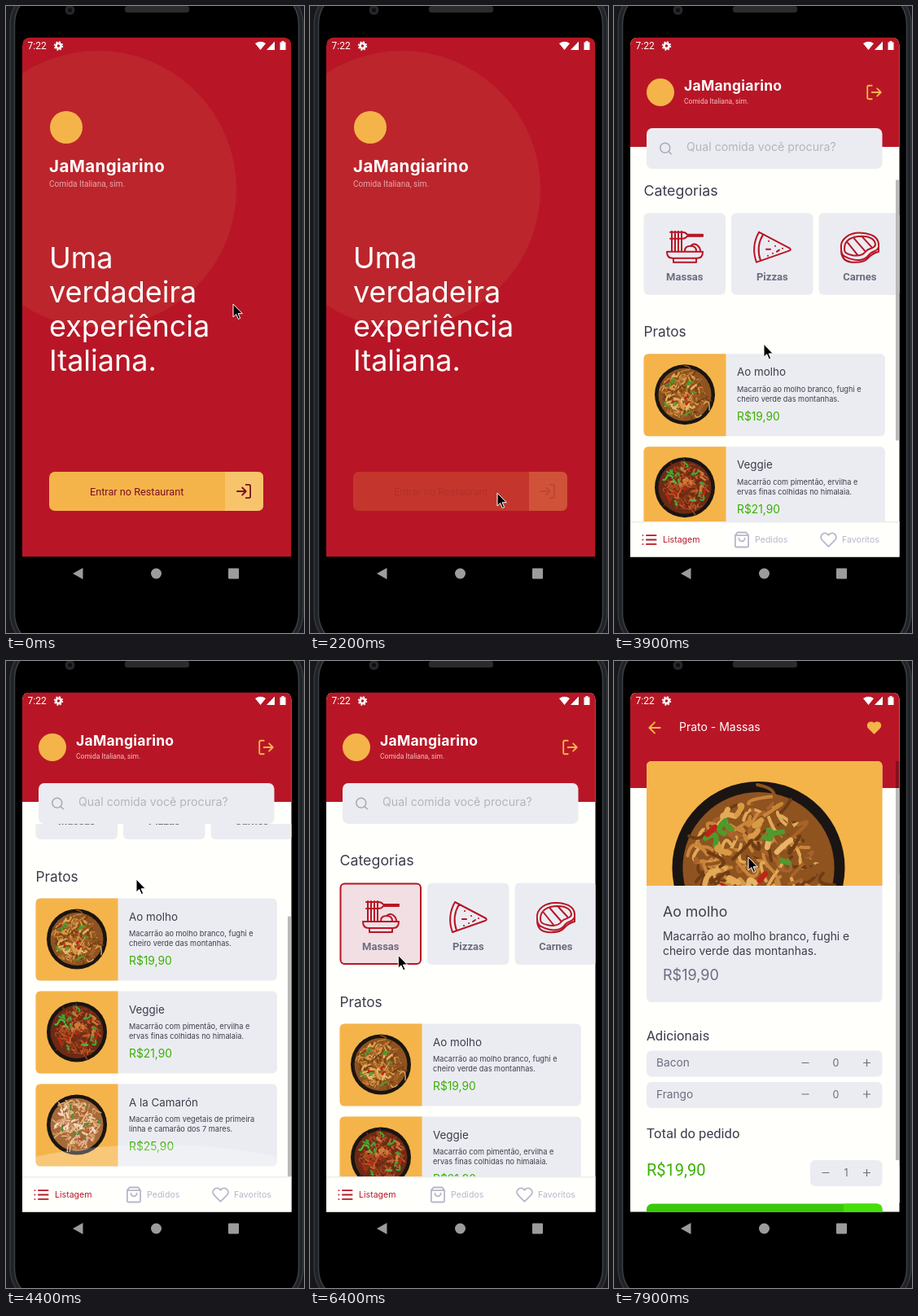
Write an HTML page that moves like this. It is 366 by 770 pixels and loops after 8 s.

```html
<!DOCTYPE html>
<html lang="pt">
<head>
<meta charset="utf-8">
<style>
html, body { margin: 0; width: 100%; height: 100%; overflow: hidden; background: #17181c; }
svg { display: block; width: 100vw; height: 100vh; font-family: Inter, sans-serif; }
.rb { font-family: Roboto, sans-serif; }
.press > * { opacity: var(--fade, 1); }
</style>
</head>
<body>
<script>
const RED = '#b81626', GOLD = '#f5b44a', PAPER = '#fffffc', CARD = '#ebecf1',
  INK = '#3d3d4d', GREY = '#6c6c80', PALE = '#b7b7cc', GREEN = '#39b100', BRAND = 'JaMangiarino';

// ---------- drawing helpers ----------
const text = (x, y, size, str, fill, more = '') =>
  `<text x="${x}" y="${y}" font-size="${size}" fill="${fill}" ${more}>${str}</text>`;
const roboto = (x, y, size, str, fill, more = '') => text(x, y, size, str, fill, 'class="rb" ' + more);
const rect = (x, y, w, h, fill, r = 0, more = '') =>
  `<rect x="${x}" y="${y}" width="${w}" height="${h}" rx="${r}" fill="${fill}" ${more}/>`;
const circle = (x, y, r, fill, more = '') => `<circle cx="${x}" cy="${y}" r="${r}" fill="${fill}" ${more}/>`;
const path = (d, fill, more = '') => `<path d="${d}" fill="${fill}" ${more}/>`;
const group = (id, body, more = '') => `<g id="${id}" ${more}>${body}</g>`;
// Box with a straight edge at x, rounded on the far side; a negative w points left
const cap = (x, y, w, h, fill, r) => {
  const k = Math.sign(w) * r;
  return path(`M${x} ${y}h${w - k}q${k} 0 ${k} ${r}v${h - 2 * r}q0 ${r} ${-k} ${r}h${k - w}z`, fill);
};
const icon = (x, y, k, color, d, fill = 'none') => path(d, fill,
  `stroke="${color}" stroke-width="2" stroke-linecap="round" stroke-linejoin="round"
   transform="translate(${x} ${y}) scale(${k}) translate(-12 -12)"`);
const stepper = (minus, mid, plus, y, n) =>
  path(`M${minus - 4.5} ${y}h9M${plus - 4.5} ${y}h9M${plus} ${y - 4.5}v9`, 'none', `stroke="${GREY}" stroke-width="1.2"`) +
  text(mid, y + 4.5, 12.5, n, GREY, 'text-anchor="middle"');

const HEART = 'M20.84 4.61a5.5 5.5 0 0 0-7.78 0L12 5.67l-1.06-1.06a5.5 5.5 0 0 0-7.78 7.78L12 21.23l8.84-8.84a5.5 5.5 0 0 0 0-7.78z';

// A plate of noodles, radius 37, around the origin
function plate(seed, noodles, toppings) {
  const rnd = () => (seed = seed * 16807 % 2147483647) / 2147483647;
  const pick = list => list[Math.floor(rnd() * list.length)];
  const off = n => ((rnd() - .5) * n).toFixed(1);
  const strand = (reach, size, width, colors) => {
    const a = rnd() * 6.283, d = reach * Math.sqrt(rnd());
    return path(`M${(d * Math.cos(a)).toFixed(1)} ${(d * Math.sin(a)).toFixed(1)}q${off(size)} ${off(size)} ${off(size)} ${off(size)}`,
      'none', `stroke="${pick(colors)}" stroke-width="${width}" stroke-linecap="round"`);
  };
  let s = circle(0, 0, 37, '#1a1512') + circle(0, 0, 32.5, noodles[0]);
  for (let i = 0; i < 170; i++) s += strand(28, 18, 1.4, noodles);
  for (let i = 0; i < 34; i++) s += strand(26, 12, 2.3, toppings);
  return s;
}
const plates = [
  plate(11, ['#8f5320', '#c9863a', '#e0a957', '#a8632a', '#6e3c14'], ['#4f9a2c', '#c02318', '#e8b568', '#d99a45', '#e3aa58']),
  plate(29, ['#6d2a15', '#a8451f', '#c4642c', '#8a3a1b'], ['#3fa535', '#4db53a', '#b52a17', '#d07b3a']),
  plate(53, ['#a8693a', '#e3b880', '#d39a62', '#f0d0a4'], ['#e8a79a', '#f4d9c4', '#5a8a3a', '#b8552f'])
];

// ---------- welcome screen ----------
const backdrop = rect(20, 38, 331, 640, PAPER);
const splash = rect(20, 38, 331, 640, RED) + circle(113, 225, 170, '#bc252c') +
  circle(74, 149, 20, GOLD) +
  text(53, 204, 20.5, BRAND, '#fff', 'font-weight="700" letter-spacing=".4"') +
  roboto(53, 222, 10, 'Comida Italiana, sim.', '#e8a5aa') +
  ['Uma', 'verdadeira', 'experiência', 'Italiana.'].map((s, i) => text(53, 322 + 42 * i, 36, s, '#fff')).join('') +
  group('enter', rect(53, 572, 263, 48, GOLD, 7) + cap(269, 572, 47, 48, '#f7c46c', 7) +
    roboto(103, 601, 12.7, 'Entrar no Restaurant', '#7a1020') +
    icon(292, 596, .9, '#7a1020', 'M15 3h4a2 2 0 0 1 2 2v14a2 2 0 0 1-2 2h-4M10 17l5-5-5-5M15 12H3'), 'class="press"');

// ---------- list screen ----------
const line = d => path(d, 'none', `stroke="${RED}" stroke-width="2" stroke-linecap="round" stroke-linejoin="round"`);
const pictures = [
  'M65 320h44q0 8-7 8h-30q-7 0-7-8zM73 328v5h28v-5M69 296h15q4 0 6 3h19v2h-19q-2 3-6 3h-15M71 295v25M75 295v25M79 295v25M83 295v25M87 319q0-6 7-6t7 6M94 313q4-4 8-1t4 7',
  'M178 296L216 316q2 2-1 3L175 333Q168 314 178 296M183 299Q174 314 180 331M190 307h.1M187 317h5M189 325h.1M198 313h.1M200 320l3-2M207 316h.1M195 322h.1',
  'M279 317C277 304 290 296 304 297S326 303 325 314C324 321 317 318 313 324S300 332 291 329S279 324 279 317M283 316C283 306 292 301 304 301S321 306 321 312C319 317 313 315 309 320S299 326 291 324S283 320 283 316M287 309l12 15M295 304l13 15M305 302l11 12M279 320q1 12 13 13q15 1 20-5t13-8v-5'
];
const category = (name, i) => {
  const x = 36.5 + 107.5 * i;
  return group('cat' + i, rect(x, 272.5, 100.5, 100.5, CARD, 6) +
    (i ? '' : group('chosen', rect(x + 1, 273.5, 98.5, 98.5, '#f1dfe3', 5, `stroke="${RED}" stroke-width="2"`))) +
    line(pictures[i]) + roboto(x + 50.3, 355, 13, name, GREY, 'font-weight="600" text-anchor="middle"'), 'class="press"');
};
const dish = ([name, a, b, price], i) => group('dish' + i,
  rect(36.5, 0, 296.5, 101, CARD, 6) + cap(137.5, 0, -101, 101, GOLD, 6) +
  `<g><g class="photo" transform="translate(87 50)">${plates[i]}</g></g>` +
  text(151, 27, 13.4, name, INK) + text(151, 46.5, 9.2, a, INK) + text(151, 58.5, 9.2, b, INK) +
  text(151, 81.5, 13.8, price, GREEN), `class="press" transform="translate(0 ${445.5 + 114 * i})"`);
const dishes = [
  ['Ao molho', 'Macarrão ao molho branco, fughi e', 'cheiro verde das montanhas.', 'R$19,90'],
  ['Veggie', 'Macarrão com pimentão, ervilha e', 'ervas finas colhidas no himalaia.', 'R$21,90'],
  ['A la Camarón', 'Macarrão com vegetais de primeira', 'linha e camarão dos 7 mares.', 'R$25,90']
];
const tab = (x, label, color, d, ix) => text(x, 658.5, 10.6, label, color) + icon(ix, 655.5, .9, color, d);

const list = backdrop + rect(20, 38, 331, 135, RED) +
  circle(57, 106, 17, GOLD) +
  text(86, 104, 17.5, BRAND, '#fff', 'font-weight="700" letter-spacing=".25"') +
  roboto(86, 119.5, 8.5, 'Comida Italiana, sim.', '#f0c0c4') +
  icon(319.5, 106, .92, GOLD, 'M9 21H5a2 2 0 0 1-2-2V5a2 2 0 0 1 2-2h4M16 17l5-5-5-5M21 12H9') +
  rect(40, 150, 289.5, 50, CARD, 7) +
  icon(63.5, 175, .75, '#a9a9b8', 'M19 11a8 8 0 1 1-16 0 8 8 0 0 1 16 0M21 21l-4.35-4.35') +
  text(89, 177.5, 14.2, 'Qual comida você procura?', '#b4b4be') +
  `<g clip-path="url(#view)">` + group('scroll',
    text(36.5, 251, 17.8, 'Categorias', INK) + ['Massas', 'Pizzas', 'Carnes'].map(category).join('') +
    text(36.5, 424.5, 17.3, 'Pratos', INK) + group('dishes', dishes.map(dish).join(''))) +
  `<ellipse id="glow" cx="185" cy="662" rx="240" ry="68" fill="#fff"/>` +
  rect(346, 200, 4.5, 320, '#b9b9bb', 0, 'id="bar"') + '</g>' +
  rect(20, 633.5, 331, 45, PAPER) + rect(20, 633, 331, 1.5, '#ededf0') +
  tab(60, 'Listagem', RED, 'M8 6h13M8 12h13M8 18h13M3 6h.01M3 12h.01M3 18h.01', 43.5) +
  tab(173, 'Pedidos', PALE, 'M6 2L3 6v14a2 2 0 0 0 2 2h14a2 2 0 0 0 2-2V6l-3-4zM3 6h18M16 10a4 4 0 0 1-8 0', 157) +
  tab(280, 'Favoritos', PALE, HEART, 263.5);

// ---------- dish screen ----------
const extra = (name, y) => rect(40, y, 289.5, 32, CARD, 6) +
  text(52, y + 19.5, 13.7, name, GREY) + stepper(235, 272.5, 310.5, y + 15, 0);
const detail = backdrop + rect(20, 38, 331, 118, RED) +
  icon(50, 82, .95, GOLD, 'M19 12H5M12 19l-7-7 7-7') + text(80, 86, 14, 'Prato - Massas', '#fff') +
  icon(319.5, 82, .76, GOLD, HEART, GOLD) +
  rect(40, 123, 289.5, 296, CARD, 6, 'id="panel"') + path('M40 276V129q0-6 6-6h277.5q6 0 6 6v147z', GOLD) +
  `<g clip-path="url(#top)">${group('bigPhoto', plates[0], 'transform="translate(177.5 254) scale(2.865)"')}</g>` +
  group('info', text(60, 314, 17.7, 'Ao molho', INK) +
    text(60, 343, 13.8, dishes[0][1], INK) + text(60, 361, 13.8, dishes[0][2], INK) +
    text(60, 392, 18, 'R$19,90', GREY)) +
  group('extras', roboto(40, 466, 16.6, 'Adicionais', INK) +
    group('rows', extra('Bacon', 478.5) + extra('Frango', 517))) +
  group('total', roboto(40, 586, 16.6, 'Total do pedido', INK) + roboto(40, 632, 20, '', GREEN, 'id="sum"') +
    rect(241, 613, 88.5, 32, CARD, 6) + stepper(260, 285, 310.5, 628.5, 1) +
    rect(40, 666.5, 289.5, 47.5, '#39c80a', 7) + cap(282, 666.5, 47.5, 47.5, '#45e00c', 7) +
    roboto(112, 695, 12.7, 'Confirmar pedido', '#fff') +
    icon(306, 690.5, .85, '#fff', 'M9 11l3 3L22 4M21 12v7a2 2 0 0 1-2 2H5a2 2 0 0 1-2-2V5a2 2 0 0 1 2-2h11')) +
  rect(346, 123, 4.5, 490, '#000', 0, 'id="bar2" opacity=".28"');

// ---------- phone ----------
const status = roboto(26.5, 53, 12, '7:22', '#fff') +
  circle(64.5, 49, 3.1, 'none', 'stroke="#fff" stroke-width="2.6"') +
  circle(64.5, 49, 4.9, 'none', 'stroke="#fff" stroke-width="1.6" stroke-dasharray="2 1.85"') +
  path('M312.500 54l-6.500-8q6.500-4.500 13 0zM320 54h10v-10.500zM336.500 44.500h2v-1.500h3v1.500h2v9.500h-7z', '#fff');
const screen = (id, body, clip) =>
  `<g clip-path="url(#${clip})">${group(id, body)}${rect(20, 38, 331, 640, '#000', 0, `id="${id}Dim"`)}</g>`;

document.body.innerHTML = `<svg viewBox="0 0 366 770"><defs>
  <clipPath id="glass"><path d="M20 676.500V48.500q0-10 10-10h310.500q10 0 10 10v628z"/></clipPath>
  <clipPath id="view"><rect x="20" y="200" width="331" height="434"/></clipPath>
  <clipPath id="top"><rect x="40" y="123" width="290" height="153"/></clipPath>
  <clipPath id="clip1"><rect id="edge1" x="20" width="331" height="700"/></clipPath>
  <clipPath id="clip2"><rect id="edge2" x="20" width="331" height="700"/></clipPath></defs>` +
  rect(0, 0, 366, 770, '#17181c') +
  rect(5, -25, 360, 818, '#202327', 48, 'stroke="#34383d" stroke-width="1.5"') +
  rect(10.5, -20, 349, 808, '#000', 42, 'stroke="#3b3f44" stroke-width="1.5"') +
  circle(78.5, 5, 6, '#26272a') + circle(78.5, 5, 2.5, '#0d0e11') + rect(146, 0, 79, 8, '#2a2b2d', 3) +
  path('M82 697l12.500-7v14z', '#9c9c9c') + circle(184.5, 697, 6.5, '#9c9c9c') + rect(273, 690.5, 13, 13, '#9c9c9c', 1) +
  `<g clip-path="url(#glass)">` + screen('splash', splash, 'glass') + screen('list', list, 'clip1') +
  screen('detail', detail, 'clip2') + status + '</g>' +
  group('cursor', path('M0 0v16l3.700-3.500 2.600 6 2.400-1-2.600-5.800h5.200z', '#000', 'stroke="#fff"')) + '</svg>';

// ---------- motion ----------
const $ = id => document.getElementById(id);
const set = (id, name, v) => $(id).setAttribute(name, v);
const show = (id, on) => set(id, 'display', on ? 'inline' : 'none');
const shift = (id, y, x = 0) => set(id, 'transform', `translate(${x} ${y})`);
const ramp = (t, a, b) => Math.min(1, Math.max(0, (t - a) / (b - a)));
const cubic = (s, p, q) => 3 * (1 - s) ** 2 * s * p + 3 * (1 - s) * s * s * q + s ** 3;

// Touch feedback: every layer of the button fades on its own
function press(id, t, down, up) {
  const fade = 1 - .8 * (ramp(t, down, down + 150) - ramp(t, up, up + 200));
  $(id).style.setProperty('--fade', fade);
}

function ease(u) {
  let lo = 0, hi = 1, s;
  for (let i = 0; i < 20; i++) {
    s = (lo + hi) / 2;
    if (cubic(s, .20833, .25) < u) lo = s; else hi = s;
  }
  return cubic(s, .82, 1);
}

// time, x, y of the pointer tip
const trail = [
  [300, 279, 366], [400, 227, 463], [500, 227, 463], [600, 209, 520], [800, 233, 618], [900, 233, 618],
  [1000, 232, 638], [1200, 229, 604], [1300, 229, 604], [1400, 229, 603], [1500, 229, 603], [1700, 230, 598],
  [2500, 230, 598], [2900, 249, 538], [3200, 172, 256], [3300, 172, 256], [3400, 206, 314], [3500, 206, 314],
  [3800, 190, 452], [4300, 160, 268], [4500, 160, 268], [5000, 112, 490], [5300, 100, 501], [5500, 87, 337],
  [5600, 84, 325], [6300, 84, 325], [6600, 157, 434], [6700, 189, 508], [7000, 189, 508], [7200, 121, 315],
  [7600, 165, 241], [8000, 165, 241]
];
function pointer(t) {
  const i = trail.findIndex(k => k[0] > t), b = trail[i], a = trail[i - 1] || b;
  const u = a === b ? 0 : ramp(t, a[0], b[0]);
  return [1, 2].map(n => a[n] + (b[n] - a[n]) * u);
}

// The new screen is uncovered from the bottom while the old one lifts and dims
function reveal(n, from, t, start) {
  const p = ease(ramp(t, start, start + 425));
  shift(from, -12.8 * p);
  set(from + 'Dim', 'opacity', .1 * Math.min(1, p / .36));
  set('edge' + n, 'y', 39 + 638 * (1 - p));
  return 26 * (1 - p);
}

function draw(t) {
  const enter = reveal(1, 'splash', t, 2463);
  const open = reveal(2, 'list', t, 7163);
  if (t < 7163) shift('list', enter);
  shift('detail', open);
  set('detailDim', 'opacity', 0);
  press('enter', t, 2050, 2450);

  const y = 154 * (ramp(t, 3850, 4270) - ramp(t, 4550, 4950));
  shift('scroll', -y);
  set('bar', 'y', 200 + y * 434 / 588);
  set('bar', 'opacity', ramp(t, 3700, 3800) - ramp(t, 5250, 5500));
  set('glow', 'opacity', .25 * (ramp(t, 4200, 4350) - ramp(t, 4450, 4650)));
  show('dishes', t >= 3000);
  for (const el of document.querySelectorAll('.photo')) el.setAttribute('opacity', ramp(t, 3000, 3300));
  press('cat0', t, 5750, 6000);
  show('chosen', t >= 6000);
  press('dish0', t, 6850, 7100);

  const ready = t >= 7400;
  for (const id of ['info', 'rows', 'bar2']) show(id, ready);
  set('panel', 'height', ready ? 296 : 274);
  shift('extras', ready ? 0 : -22);
  shift('total', ready ? 0 : -100);
  $('sum').textContent = ready ? 'R$19,90' : 'R$NaN';
  set('bigPhoto', 'opacity', ramp(t, 7700, 7900));

  const [px, py] = pointer(t);
  shift('cursor', py, px);
}

function tick(now) {
  draw(Math.floor(now % 8000 / 100) * 100);
  requestAnimationFrame(tick);
}
draw(0);
requestAnimationFrame(tick);
</script>
</body>
</html>
```
